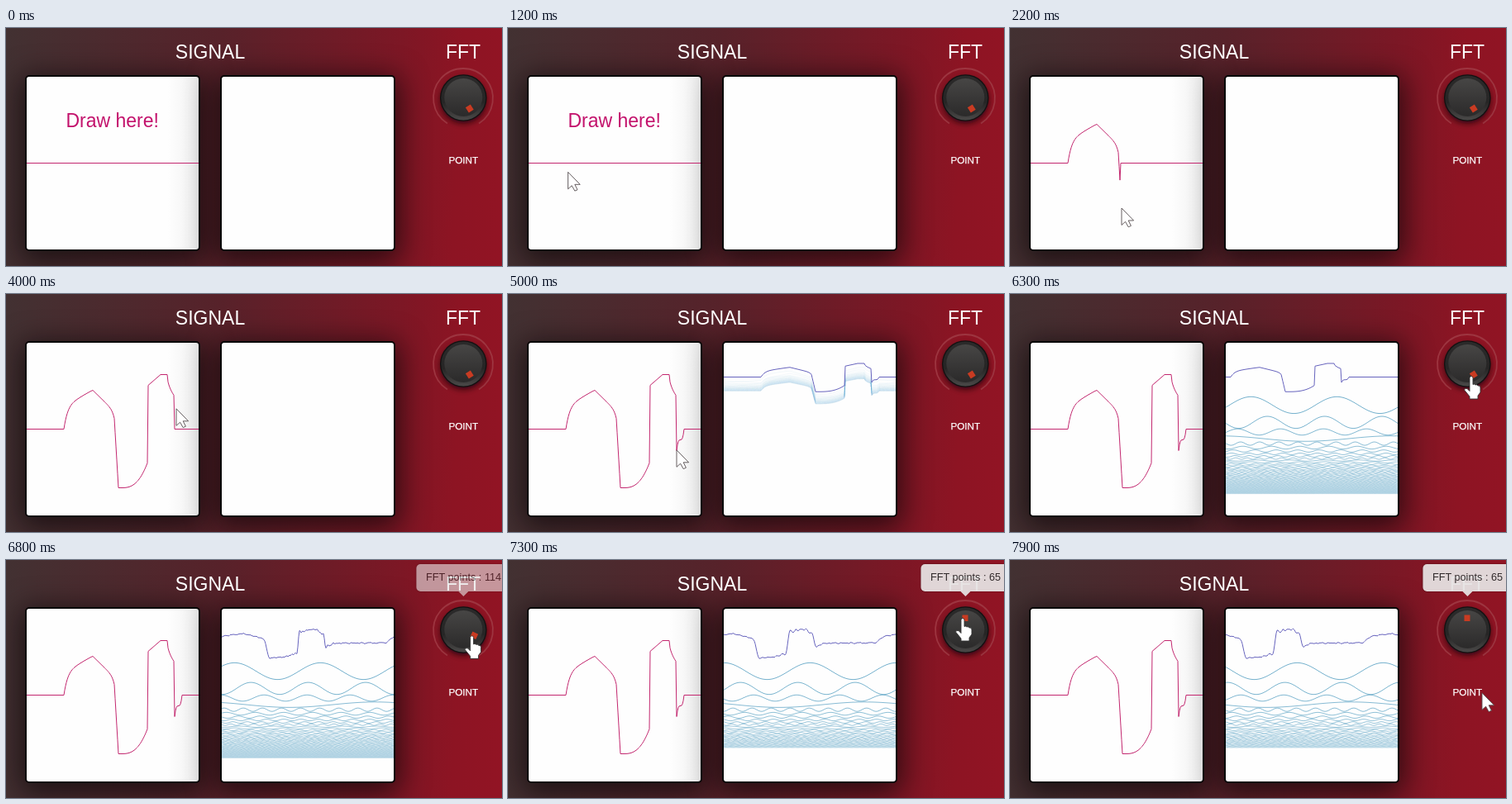
Animation of 600x288 px, one loop 8 s. Source, as an HTML page with a canvas:

```html
<!DOCTYPE html>
<html lang="en">
<head>
<meta charset="utf-8">
<title>Signal and FFT</title>
<style>
  html, body { margin: 0; width: 100%; height: 100%; overflow: hidden; }
  #stage {
    position: relative; width: 600px; height: 288px; overflow: hidden;
    font-family: "Liberation Sans", Arial, sans-serif;
    background: linear-gradient(93deg, #423132 0%, #57222a 42%, #7d1725 78%, #8d1423 90%, #921424 100%);
  }
  .panel {
    position: absolute; top: 57px; width: 208px; height: 209px;
    border: 2px solid #080506; border-radius: 5px; background: #fefefe;
    box-shadow: 0 7px 34px 5px rgba(8, 4, 6, .68);
  }
  #left { left: 23px; background: linear-gradient(90deg, #fefefe 82%, #f7f7f7 91%, #e9e9e9 100%); }
  #right { left: 259px; }
  canvas { display: block; }
  svg { position: absolute; left: 0; top: 0; }
  #tip {
    position: absolute; left: 553.5px; top: 5px; height: 33px; padding: 0 12px;
    transform: translateX(-50%); border-radius: 5px; background: #e6e3e3;
    color: #2c2c2c; font-size: 12.7px; line-height: 33px; white-space: nowrap;
    box-shadow: 0 0 2px rgba(0, 0, 0, .5);
  }
  #tip::after {
    content: ""; position: absolute; left: 50%; top: 33px; margin-left: -6px;
    border: 6px solid transparent; border-top-color: #e6e3e3; border-bottom: 0;
  }
</style>
</head>
<body>
<div id="stage">
  <div class="panel" id="left"></div>
  <div class="panel" id="right"><canvas id="waves" width="208" height="209"></canvas></div>
  <svg width="600" height="288" viewBox="0 0 600 288">
    <defs>
      <linearGradient id="rim" x1="0" y1="0" x2="0" y2="1">
        <stop offset="0" stop-color="#2b2a2a"/>
        <stop offset=".6" stop-color="#262525"/>
        <stop offset="1" stop-color="#4a4948"/>
      </linearGradient>
      <linearGradient id="face" x1="0" y1="0" x2="0" y2="1">
        <stop offset="0" stop-color="#474645"/>
        <stop offset="1" stop-color="#2b2a2a"/>
      </linearGradient>
      <filter id="soft" x="-40%" y="-40%" width="180%" height="180%">
        <feGaussianBlur stdDeviation="3"/>
      </filter>
    </defs>
    <g fill="#fff" text-anchor="middle">
      <text x="247" y="37.4" font-size="23">SIGNAL</text>
      <text x="553" y="37.4" font-size="23">FFT</text>
      <text x="553.3" y="164" font-size="11.7" stroke="#fff" stroke-width=".25">POINT</text>
    </g>
    <text id="hint" x="128.7" y="119.5" font-size="23" text-anchor="middle" fill="#c3126c">Draw here!</text>
    <path id="trace" fill="none" stroke="#c3276f" stroke-width="1"/>
    <path d="M533.9 115.5A36 36 0 1 1 572.1 115.5" fill="none" stroke="#9d3540" stroke-width="1.8"/>
    <circle cx="553.5" cy="88" r="28" fill="#160609" opacity=".7" filter="url(#soft)"/>
    <circle cx="553.3" cy="84.5" r="28.3" fill="#111"/>
    <circle cx="553.3" cy="84.5" r="27" fill="url(#rim)"/>
    <circle cx="553.3" cy="84" r="23" fill="url(#face)"/>
    <rect id="mark" x="549.5" y="66.5" width="7" height="7.5" fill="#c93b22"/>
  </svg>
  <div id="tip"></div>
  <svg width="600" height="288" viewBox="0 0 600 288">
    <path id="arrow" d="M0 .8V21.3L4.6 17.2 8.2 23.6 11.4 22.2 8.2 15.8H14.6Z" fill="#fff" stroke="#554d50" stroke-width=".9"/>
    <path id="hand" d="M-5 3Q-3-.2 -1 3V11.5Q1 10.3 2 12Q4 11 5 13Q7.5 12.3 8 15V21L5 25V29H-5V26L-11.5 18Q-10.5 15.5 -8 16.5L-5 19.5Z"
      fill="#fff" stroke="#333" stroke-width=".9" stroke-linejoin="round"/>
  </svg>
</div>
<script>
const $ = id => document.getElementById(id);
const ctx = $('waves').getContext('2d');
const LOOP = 8000, STEP = 100;
const X0 = 25, SPAN = 208, X1 = X0 + SPAN, ZERO = 163;
const DRAW = 1300, CREST = 2200, LIFT = 4000, RELEASE = 5000;
const GRAB = 6550, DROP = 7300;
const FULL = 128, SCROLL = 0.03; // points, px per ms

const clamp = v => Math.min(1, Math.max(0, v));
const ramp = (v, a, b, from, to) => from + (to - from) * clamp((v - a) / (b - a));

// Drawn curve in stage coordinates: hump, trough, plateau, hook
function curve(x) {
  if (x <= 70 || x >= 213) return ZERO;
  if (x < 105) {
    const d = (105 - x) / 35;
    return 116 + 47 * (0.45 * d ** 1.1 + 0.55 * d ** 8);
  }
  if (x < 131) {
    const d = (x - 105) / 26;
    return 116 + 34 * (0.75 * d + 0.25 * d ** 10);
  }
  if (x < 136) return ramp(x, 131, 136, 150, 234);
  if (x < 171) return 234 - 30 * Math.abs((x - 139) / 32) ** 2.8;
  if (x < 172) return ramp(x, 171, 172, 204, 110);
  if (x < 195) return ramp(x, 172, 187, 110, 97);
  if (x < 203) return 97 + 25 * Math.sqrt((x - 195) / 8);
  if (x < 204) return ramp(x, 203, 204, 122, 189);
  return 176 - 104 * ((x - 204) / 9 - 0.5) ** 3;
}

function penX(t) {
  if (t < DRAW) return X0;
  if (t < CREST) return ramp(t, DRAW, CREST, 70, 133);
  if (t < LIFT) return 203 - 70 * ramp(t, CREST, LIFT, 1, 0) ** 2;
  return ramp(t, LIFT, 4500, 203, 213);
}

const knobAngle = t => 148 * (1 - ramp(t, GRAB, DROP, 0, 1) ** 1.37);

function pointer(t) {
  const glide = (t0, t1, [ax, ay], [bx, by]) => [ramp(t, t0, t1, ax, bx), ramp(t, t0, t1, ay, by)];
  const hook = [204, 188], rest = [474, 109], knob = [561, 98];
  if (t < DRAW) return glide(0, DRAW, [104, 300], [70, ZERO]);
  if (t < LIFT) {
    const x = penX(t) + 2;
    return [x, (curve(x - 1) + curve(x + 1)) / 2];
  }
  if (t < RELEASE) return glide(LIFT, 4800, [206, 138], hook);
  if (t < 5700) return glide(RELEASE, 5700, hook, rest);
  if (t < GRAB) return glide(5700, 6250, rest, knob);
  if (t < DROP) {
    const a = knobAngle(t) * Math.PI / 180;
    return [553 + 15 * Math.sin(a), 84 - 15 * Math.cos(a)];
  }
  return glide(DROP, 7900, [553, 69], [571, 160]);
}

// Small-scale height of the curve at u px into the panel
const level = u => (ZERO - curve(X0 + u)) / 4;

const SAMPLES = 256;
const samples = Array.from({ length: SAMPLES }, (_, i) => level(i / SAMPLES * SPAN));
const mean = samples.reduce((a, b) => a + b) / SAMPLES;
const harmonics = Array.from({ length: FULL / 2 }, (_, i) => {
  const k = i + 1;
  let re = 0, im = 0;
  samples.forEach((v, n) => {
    const a = 2 * Math.PI * k * n / SAMPLES;
    re += v * Math.cos(a);
    im += v * Math.sin(a);
  });
  return { k, amp: 2 * Math.hypot(re, im) / SAMPLES, phase: Math.atan2(im, re) };
}).sort((a, b) => b.amp - a.amp);

const wave = (h, u) => h.amp * Math.cos(2 * Math.PI * h.k * u / SPAN - h.phase);

// Seeded ripple of the reduced signal, within half a pixel or so
const ripple = u => 1.4 * (Math.abs(Math.sin(Math.floor(u / 2) * 12.99) * 4375.85) % 1 - 0.5);

function stroke(color, alpha, yAt) {
  ctx.strokeStyle = color;
  ctx.globalAlpha = alpha;
  ctx.beginPath();
  for (let x = 0; x <= SPAN; x++) ctx.lineTo(x, yAt(x) - 58.5);
  ctx.stroke();
}

function drawWaves(t, points) {
  ctx.clearRect(0, 0, SPAN, 209);
  if (t < RELEASE) return;
  const age = t - RELEASE;
  const p = 1 - 0.88 * Math.exp(-age / 207);
  const shift = age * SCROLL;
  const kept = harmonics.filter(h => h.k <= points / 2);
  const signal = Array.from({ length: SPAN + 1 }, (_, x) => {
    const u = (x + shift) % SPAN;
    if (points >= FULL) return 100 - level(u);
    return 100 - kept.reduce((sum, h) => sum + wave(h, u), mean) - ripple(u);
  });
  kept.forEach((h, i) => {
    const octave = Math.log2(i + 1);
    const base = 134 + octave * (21.5 - 0.6 * octave);
    const alpha = 0.9 * p ** 1.2 / (1 + i / 20);
    stroke('#66a9c8', alpha, x => signal[x] * (1 - p) + (base - wave(h, x + shift)) * p);
  });
  stroke('#6663bd', 1, x => signal[x]);
}

function drawTrace(t) {
  const pen = penX(t);
  let d = '';
  for (let x = X0; x <= X1; x++) d += `${d ? 'L' : 'M'}${x} ${(x <= pen ? curve(x) : ZERO) + 0.5}`;
  $('trace').setAttribute('d', d);
}

function render(t) {
  const angle = knobAngle(t);
  const points = Math.round(65 + angle * 0.426);
  const grab = t >= 6200 && t < 7500;

  $('hint').style.display = t < DRAW ? '' : 'none';
  drawTrace(t);
  drawWaves(t, points);
  $('mark').setAttribute('transform', `rotate(${angle} 553 85)`);
  $('tip').textContent = 'FFT points : ' + points;
  $('tip').style.opacity = ramp(t, 6500, 6950, 0, 0.94);
  for (const [id, on] of [['arrow', !grab], ['hand', grab]]) {
    $(id).setAttribute('transform', `translate(${pointer(t)})`);
    $(id).style.display = on ? '' : 'none';
  }
}

const start = performance.now();
let last = -1;
function tick() {
  const t = Math.floor((performance.now() - start) % LOOP / STEP) * STEP;
  if (t !== last) render(last = t);
  requestAnimationFrame(tick);
}
tick();
</script>
</body>
</html>
```
